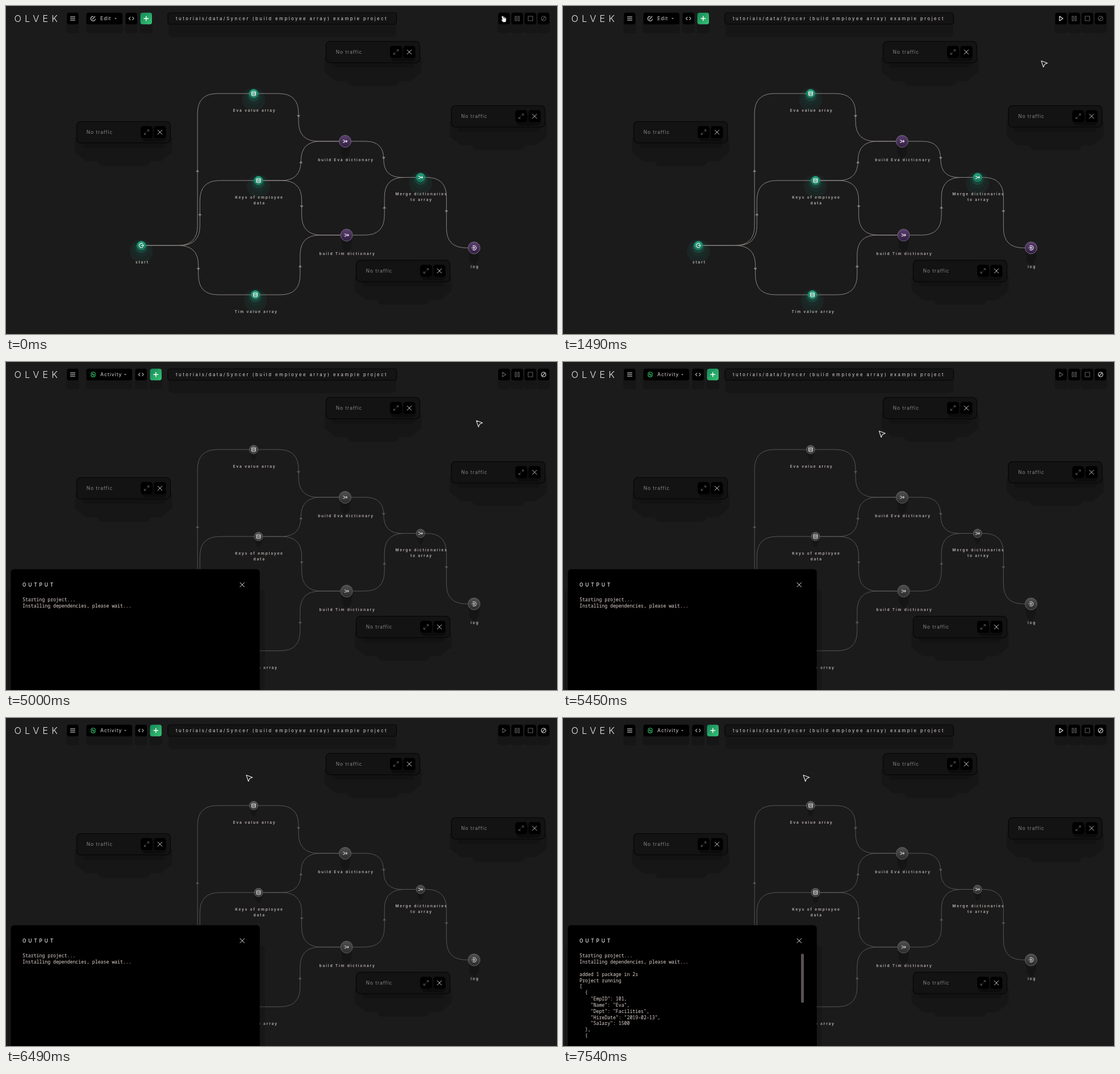
An HTML page for the animation above (8000 ms loop, 970x577 px).

```html
<!DOCTYPE html>
<html lang="en">
<head>
<meta charset="utf-8">
<title>Flow editor</title>
<style>
html, body { margin: 0; width: 100%; height: 100%; overflow: hidden; background: #1b1b1b; }
svg { display: block; width: 970px; height: 577px; }
text { font-family: Inter, "Open Sans", sans-serif; white-space: pre; }
.brand { font-size: 16.5px; font-weight: 300; letter-spacing: 6px; fill: #e6e6e6; }
.title { font-size: 7.7px; font-weight: 500; letter-spacing: 2.5px; fill: #c4bdbb; }
.label { font-size: 6.6px; font-weight: 600; letter-spacing: 1.8px; fill: #c0b6b4; text-anchor: middle; }
.traffic { font-size: 8.4px; letter-spacing: .95px; fill: #8c8685; }
.mode { font-size: 8.6px; letter-spacing: 1px; fill: #ddd6d4; }
.heading { font-size: 8.4px; font-weight: 500; letter-spacing: 3.8px; fill: #eee; }
.mono { font: 8.2px "Noto Sans Mono", "Liberation Mono", monospace; fill: #e2d6d2; }
.icon { fill: none; stroke-linecap: round; stroke-linejoin: round; }
</style>
</head>
<body>
<svg id="stage" viewBox="0 0 970 577" xmlns="http://www.w3.org/2000/svg"></svg>
<script>
const LOOP = 8000, RUN = 1790, READY = 6940, DONE = 7540;
const BRIGHT = '#e8e2e0', DIM = '#625e5e';

const icons = {
  menu: 'M-4-3H4M-4 0H4M-4 3H4',
  code: 'M-2-2.5L-4.3 0L-2 2.5M2-2.5L4.3 0L2 2.5',
  plus: 'M-3.7 0H3.7M0-3.7V3.7',
  play: 'M-2.8-4L3.3 0L-2.8 4Z',
  pause: 'M-3.7-4H-1.3V4H-3.7ZM1.3-4H3.7V4H1.3Z',
  stop: 'M-4-4H4V4H-4Z',
  forbid: 'M4 0A4 4 0 1 1-4 0A4 4 0 1 1 4 0M-2.8 2.8L2.8-2.8',
  restart: 'M3.4 0A3.4 3.4 0 1 1 0-2.7H2M.3-4.6L2.2-2.7L.3-.8',
  data: 'M-3.5-2.4A3.5 1.3 0 0 1 3.5-2.4V2.6A3.5 1.3 0 0 1-3.5 2.6ZM-3.5-2.4A3.5 1.3 0 0 0 3.5-2.4M-3.5 0A3.5 1.3 0 0 0 3.5 0',
  merge: 'M-3.6-2H-2.4Q-.8-2-.3 0H3.6M-3.6 2H-2.4Q-.8 2-.3 0M2-1.6L3.6 0L2 1.6',
  enter: 'M2.4-2.8A3.7 3.7 0 1 0 2.4 2.8M-.8 0H4M2.5-1.5L4 0L2.5 1.5',
  exit: 'M-2.4-2.8A3.7 3.7 0 1 1-2.4 2.8M-4 0H1M-.5-1.5L1 0L-.5 1.5',
  close: 'M-3.8-3.8L3.8 3.8M3.8-3.8L-3.8 3.8',
  expand: 'M1-1L4-4M1.5-4H4V-1.5M-1 1L-4 4M-1.5 4H-4V1.5',
  pen: 'M0-3.8A4 4 0 1 0 3.8 1M-1.3 1.3L3.2-3.6',
  wave: 'M-3.8-1.5A4 4 0 0 1 3.8-1.5M3.8 1.5A4 4 0 0 1-3.8 1.5M-4 0H-2L-.8-1.8L.8 1.8L2 0H4'
};

const nodes = {
  start: { x: 238.3, y: 421.3, icon: 'enter', text: ['start'] },
  eva: { x: 436, y: 154, icon: 'data', text: ['Eva value array'] },
  keys: { x: 444.5, y: 307, icon: 'data', text: ['Keys of employee', 'data'] },
  tim: { x: 439, y: 508, icon: 'data', text: ['Tim value array'] },
  buildEva: { x: 597, y: 238, icon: 'merge', text: ['build Eva dictionary'], big: true },
  buildTim: { x: 599.6, y: 403, icon: 'merge', text: ['build Tim dictionary'], big: true },
  join: { x: 729.8, y: 301.5, icon: 'merge', text: ['Merge dictionaries', 'to array'] },
  log: { x: 824, y: 425.5, icon: 'exit', text: ['log'], big: true }
};

const links = ['start eva', 'start keys', 'start tim', 'eva buildEva', 'keys buildEva',
  'keys buildTim', 'tim buildTim', 'buildEva join', 'buildTim join', 'join log'];

const panels = [[563.5, 62.3], [124.5, 203.3], [784, 175.3], [616.5, 447.3]];

const rect = (x, y, w, h, r, fill, more = '') =>
  `<rect x="${x}" y="${y}" width="${w}" height="${h}" rx="${r}" fill="${fill}" ${more}/>`;
const circle = (x, y, r, fill, more = '') =>
  `<circle cx="${x}" cy="${y}" r="${r}" fill="${fill}" ${more}/>`;
const text = (cls, x, y, s) => `<text class="${cls}" x="${x}" y="${y}">${s}</text>`;
const icon = (name, x, y, color = BRIGHT, width = 1) =>
  `<path class="icon" d="${icons[name]}" transform="translate(${x} ${y})" stroke="${color}" stroke-width="${width}"/>`;
const group = (id, body) => `<g id="${id}">${body}</g>`;
const radius = n => n.big ? 11 : 8;

function grid() {
  let dots = '';
  for (let y = 28.6; y < 577; y += 68.4)
    for (let x = 29; x < 970; x += 68.4) dots += circle(x, y, .8, '#272727');
  return dots;
}

function link(pair, color) {
  const [a, b] = pair.split(' ').map(key => nodes[key]);
  const x1 = a.x + radius(a), x2 = b.x - radius(b), mid = (x1 + x2) / 2;
  const dir = Math.sign(b.y - a.y), r = Math.min(35, Math.abs(b.y - a.y) / 2);
  const tip = (a.y + b.y) / 2, base = tip - 4 * dir;
  return `<path d="M${x1} ${a.y}H${mid - r}Q${mid} ${a.y} ${mid} ${a.y + r * dir}
    V${b.y - r * dir}Q${mid} ${b.y} ${mid + r} ${b.y}H${x2}" fill="none" stroke="${color}"/>
    <path d="M${mid} ${tip}L${mid - 3} ${base}H${mid + 3}Z" fill="${color}"/>`;
}

function nodeShadow(n, running) {
  const { x, y, big } = n;
  if (!big && !running)
    return circle(x, y + 10, 20.5, '#1b2523') + circle(x, y + 6, 14, '#1a2c28') + circle(x, y + 3, 10.5, '#1a4238');
  const w = radius(n) - 1, low = y + (big ? 21 : 11);
  return `<path d="M${x - w} ${y}L${x - w + 2} ${low}Q${x} ${low + 16} ${x + w - 2} ${low}L${x + w} ${y}Z" fill="#151515"/>`;
}

function node(n, running) {
  const { x, y, big } = n;
  const paint = running ? 'gray' : big ? 'purple' : 'green';
  const ring = running ? '#626262' : big ? '#76687f' : '#1f8f70';
  return circle(x, y, radius(n) - .5, `url(#${paint})`, `stroke="${ring}"`)
    + icon(n.icon, x, y, running ? '#c8c8c8' : '#f2f2f2', 1.1)
    + n.text.map((s, i) => text('label', x + 1.6, y + (big ? 35 : 31.5) + i * 10.4, s)).join('');
}

function panel([x, y]) {
  return rect(x + 37, y + 56, 92, 22.5, 10, '#161616')
    + `<path d="M${x - 3} ${y + 28}H${x + 168}V${y + 54}L${x + 148} ${y + 70}H${x + 17}L${x - 3} ${y + 54}Z" fill="#161616"/>`
    + rect(x + 10, y + 28, 146, 18, 7, '#121212')
    + rect(x, y, 165, 37.5, 7, '#131313', 'stroke="#060606" stroke-width="1.2"')
    + rect(x + 114, y + 16, 44, 19, 8, '#0c0c0c')
    + rect(x + 112.5, y + 8, 21, 21, 4.5, '#000') + rect(x + 136, y + 8, 21, 21, 4.5, '#000')
    + icon('expand', x + 123, y + 18.7, '#777', .8) + icon('close', x + 146.5, y + 18.7, '#d8d8d8', .9)
    + text('traffic', x + 17.3, y + 21.8, 'No traffic');
}

const buttonShadow = (x, w = 20.5) => rect(x - 1, 24, w + 2, 24, 5, '#161616');

function button(x, name, w = 20.5, fill = '#000', color = BRIGHT) {
  return buttonShadow(x, w) + rect(x, 11.8, w, 20.5, 4, fill)
    + (name ? icon(name, x + w / 2, 22, color, name === 'plus' ? 1.4 : 1.1) : '');
}

function modeBar(running) {
  const w = running ? 80.5 : 63.5, end = 141.5 + w;
  return button(141.5, '', w)
    + icon(running ? 'wave' : 'pen', 153.5, 22, running ? '#35c46f' : BRIGHT, 1.1)
    + text('mode', 166, 25.1, running ? 'Activity' : 'Edit')
    + `<path d="M${end - 14} 21h4l-2 2.4z" fill="#888"/>`
    + button(end + 5.5, 'code') + button(end + 31.5, 'plus', 20.5, 'url(#mint)', '#fff');
}

function scene(running) {
  const all = Object.values(nodes);
  return all.map(n => nodeShadow(n, running)).join('')
    + links.map(l => link(l, running ? '#565656' : '#8d8583')).join('')
    + all.map(n => node(n, running)).join('') + modeBar(running);
}

const controls = (id, names, lit) => group(id, names.map((name, i) =>
  icon(name, 876.8 + i * 23.2, 22, lit[i] ? BRIGHT : DIM, 1.1)).join(''));

const lines = (id, first, list) => group(id, list.map((s, i) =>
  text('mono', 29, 421.2 + (first + i) * 10.83, s)).join(''));

const gradient = (id, top, bottom, lean = 0) => `<linearGradient id="${id}" x2="${lean}" y2="1">
  <stop stop-color="${top}"/><stop offset="1" stop-color="${bottom}"/></linearGradient>`;

const output = rect(3, 400, 453, 190, 8, '#000', 'fill-opacity=".16"') + rect(8.5, 364.5, 438.3, 230, 6, '#000')
  + text('heading', 29, 395, 'OUTPUT') + icon('close', 415.8, 391.8, '#e2e2e2')
  + lines('starting', 0, ['Starting project...', 'Installing dependencies, please wait...'])
  + lines('ready', 3, ['added 1 package in 2s', 'Project running'])
  + group('done', lines('record', 5, ['[', '  {', '    "EmpID": 101,', '    "Name": "Eva",',
    '    "Dept": "Facilities",', '    "HireDate": "2019-02-13",', '    "Salary": 1500', '  },', '  {'])
    + rect(419, 414.5, 5, 86.5, 2.5, '#5a5050'));

const stage = document.getElementById('stage');
stage.innerHTML = `<defs>${gradient('green', '#23a27a', '#147057')}${gradient('purple', '#5a4070', '#321d41')}
  ${gradient('gray', '#505050', '#2b2b2b')}${gradient('mint', '#17885a', '#36c274', 1)}</defs>`
  + rect(0, 0, 970, 577, 0, '#1b1b1b') + grid()
  + text('brand', 14.5, 28, 'OLVEK') + button(107.2, 'menu')
  + rect(286, 24, 401, 30.5, 8, '#161616')
  + rect(285, 12, 402.5, 20, 4, '#141414', 'stroke="#050505" stroke-width="1.2"')
  + text('title', 299, 24.7, 'tutorials/data/Syncer (build employee array) example project')
  + [0, 1, 2, 3].map(i => button(866.5 + i * 23.2)).join('')
  + group('edit', scene(false)) + group('activity', scene(true))
  + panels.map(panel).join('')
  + controls('editControls', ['play', 'pause', 'stop', 'forbid'], [1, 0, 0, 0])
  + controls('waitControls', ['play', 'pause', 'stop', 'forbid'], [0, 0, 0, 1])
  + controls('runControls', ['restart', 'pause', 'stop', 'forbid'], [1, 0, 1, 1])
  + controls('doneControls', ['play', 'pause', 'stop', 'forbid'], [1, 0, 0, 1])
  + group('output', output)
  + `<path id="hand" transform="translate(876 23)" d="M-3-5Q-2-6-1-5L.3-1.8Q1.3-2.6 2-1.5Q3-2 3.4-1Q4.6-1.2 4.6.2L4.5 3L3.5 5.5H-1L-4 2Q-4.5.5-3 .8L-2 1.3L-3.5-4Z"
      fill="#fff" stroke="#222" stroke-width=".7"/>
    <path id="arrow" d="M.6.6L11.3 4.4L6.3 6.6L4.2 11.5Z" fill="#151515" stroke="#f2f2f2" stroke-width="1.1" stroke-linejoin="round"/>`;

// time, tip x, tip y
const moves = [[750, 856, 27], [890, 839, 43], [1040, 834, 61], [1190, 834, 75], [1340, 839, 87],
  [1490, 841.5, 96], [5000, 827.5, 102.7], [5150, 673, 136], [5300, 574, 123], [5450, 556, 121],
  [5600, 554, 120], [5740, 472, 107], [5890, 460.3, 105], [6340, 437, 100], [6490, 422.5, 100]];

// id, visible from, visible until
const spans = [['edit', 0, RUN], ['activity', RUN, LOOP], ['output', RUN, LOOP],
  ['ready', READY, LOOP], ['done', DONE, LOOP], ['editControls', 0, RUN],
  ['waitControls', RUN, READY], ['runControls', READY, DONE], ['doneControls', DONE, LOOP],
  ['hand', 0, 750], ['arrow', 750, LOOP]]
  .map(([id, from, to]) => ({ el: document.getElementById(id), from, to }));
const arrow = document.getElementById('arrow');

function draw() {
  const t = performance.now() % LOOP;
  for (const { el, from, to } of spans) el.style.display = t >= from && t < to ? '' : 'none';
  const [, x, y] = moves.findLast(m => m[0] <= t) || moves[0];
  arrow.setAttribute('transform', `translate(${x} ${y})`);
  requestAnimationFrame(draw);
}
draw();
</script>
</body>
</html>
```
